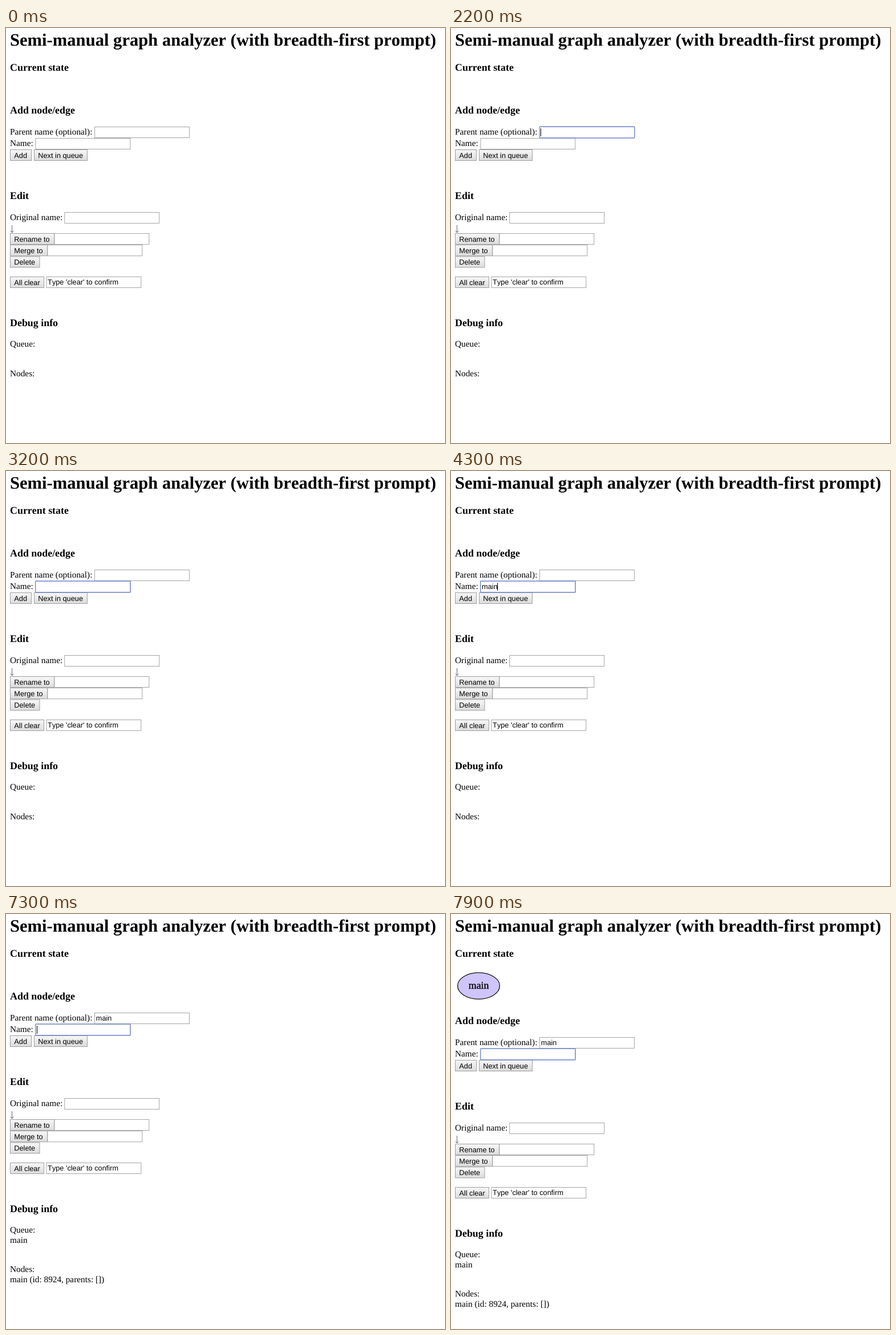
Recreate the animation shown at these times as an HTML page. Size 770 by 728 pixels, loop 8000 ms.

```html
<!DOCTYPE html>
<html lang="en">
<head>
<meta charset="utf-8">
<title>Graph analyzer</title>
<style>
  html, body { margin: 0; width: 100%; height: 100%; overflow: hidden; background: #fff; }
  svg { display: block; }
  text {
    font: 15.31px "Liberation Serif", "Times New Roman", serif;
    text-rendering: geometricPrecision;
    font-variant-ligatures: none;
    white-space: pre;
  }
  .h1 { font-size: 30.62px; font-weight: bold; }
  .h3 { font-size: 17.92px; font-weight: bold; }
  .ui { font: 12.76px "Liberation Sans", Arial, sans-serif; }
  .node { font-size: 17.86px; text-anchor: middle; stroke: #000; stroke-width: .35; }
  text, .ui { font-kerning: none; }
  .field { fill: #fff; stroke: #a4a4a4; }
  .button { fill: url(#face); stroke: #9e9e9e; }
  .arrow { fill: none; stroke: #666; }
  #ring { fill: none; stroke: #7890d6; stroke-width: 1.3; }
</style>
</head>
<body>
<svg id="stage" width="770" height="728" viewBox="0 0 770 728">
  <defs>
    <linearGradient id="face" x2="0" y2="1">
      <stop stop-color="#f7f7f7"/>
      <stop offset="1" stop-color="#dcdcdc"/>
    </linearGradient>
  </defs>
</svg>
<script>
const label = (x, y, str, cls = "", id = "") =>
  `<text x="${x}" y="${y}" class="${cls}" id="${id}">${str}</text>`;
const box = (x, y, w, cls) =>
  `<rect x="${x}" y="${y}" width="${w}" height="19" class="${cls}"/>`;
const field = (x, y, str = "", id = "") =>
  box(x, y, 166, "field") + label(x + 2.2, y + 13.7, str, "ui", id);
const button = (x, y, w, str) =>
  box(x, y, w, "button") + label(x + 6.8, y + 14.3, str, "ui");

const stage = document.getElementById("stage");
stage.innerHTML += [
  label(7, 31, "Semi-manual graph analyzer (with breadth-first prompt)", "h1"),
  label(7, 75, "Current state", "h3"),
  `<g id="graph">
    <ellipse cx="48.5" cy="126.1" rx="36.9" ry="23.2" fill="#cfc5fa" stroke="#111" stroke-width="1.3"/>`,
  label(48.6, 131, "main", "node"),
  `</g><g id="form">`,

  label(7, 150, "Add node/edge", "h3"),
  label(7, 187.4, "Parent name (optional):"),
  field(155.6, 173.5, "", "parent"),
  label(7, 207.4, "Name:"),
  field(51.9, 193.5, "", "name"),
  button(7.5, 213.5, 37, "Add"),
  button(49.5, 213.5, 93, "Next in queue"),

  label(7, 300, "Edit", "h3"),
  label(7, 337.2, "Original name:"),
  field(102.8, 323.5),
  `<path class="arrow" d="M10.5 346V359M7.5 355.5L10.5 359L13.5 355.5"/>`,
  button(7.5, 360.5, 77, "Rename to"),
  field(84.9, 360.5),
  button(7.5, 380.7, 65, "Merge to"),
  field(72.9, 380.7),
  button(7.5, 400.9, 51.5, "Delete"),
  button(7.5, 436.5, 59, "All clear"),
  field(70.9, 436.5, "Type 'clear' to confirm"),

  label(7, 523.4, "Debug info", "h3"),
  label(7, 559, "Queue:"),
  label(7, 576.5, "", "", "queue"),
  label(7, 611, "Nodes:", "", "nodes"),
  label(7, 645.6, "", "", "list"),
  `<rect id="ring" rx="1"/><rect id="caret" width="1" height="14"/></g>`
].join("");

const el = id => document.getElementById(id);
const set = (id, attrs) => {
  for (const key in attrs) el(id).setAttribute(key, attrs[key]);
};
const show = (id, on) => set(id, { visibility: on ? "visible" : "hidden" });

// Outline position and size of each control that takes the focus
const spots = {
  parent: { x: 155.3, y: 173, width: 166.7, height: 20 },
  name: { x: 51.6, y: 193, width: 166.7, height: 20 },
  add: { x: 7, y: 213.2, width: 38, height: 20 }
};
const focusTimes = [[7300, "name"], [5200, "add"], [2700, "name"], [2200, "parent"]];
const keyTimes = [3800, 4000, 4100, 4300];
const caretSpans = [[2200, 3200], [3700, 4800], [7300, 7900]];
const caretStops = [0, 10.6, 17.7, 20.6, 27.7];

function draw(t) {
  const added = t >= 7300, drawn = t >= 7400;
  const typed = added ? 0 : keyTimes.filter(k => t >= k).length;
  const focus = focusTimes.find(([start]) => t >= start)?.[1];

  el("name").textContent = "main".slice(0, typed);
  el("parent").textContent = el("queue").textContent = added ? "main" : "";
  el("list").textContent = added ? "main (id: 8924, parents: [])" : "";
  set("nodes", { y: added ? 628.3 : 611 });

  show("graph", drawn);
  set("form", { transform: `translate(0 ${drawn ? 43 : 0})` });

  show("ring", focus);
  if (focus) {
    const { x, y } = spots[focus];
    set("ring", spots[focus]);
    set("caret", { x: Math.round(x + 2 + caretStops[typed]), y: y + 3 });
  }
  show("caret", caretSpans.some(([from, to]) => t >= from && t < to));
}

function tick() {
  draw(performance.now() % 8000);
  requestAnimationFrame(tick);
}
tick();
</script>
</body>
</html>
```
